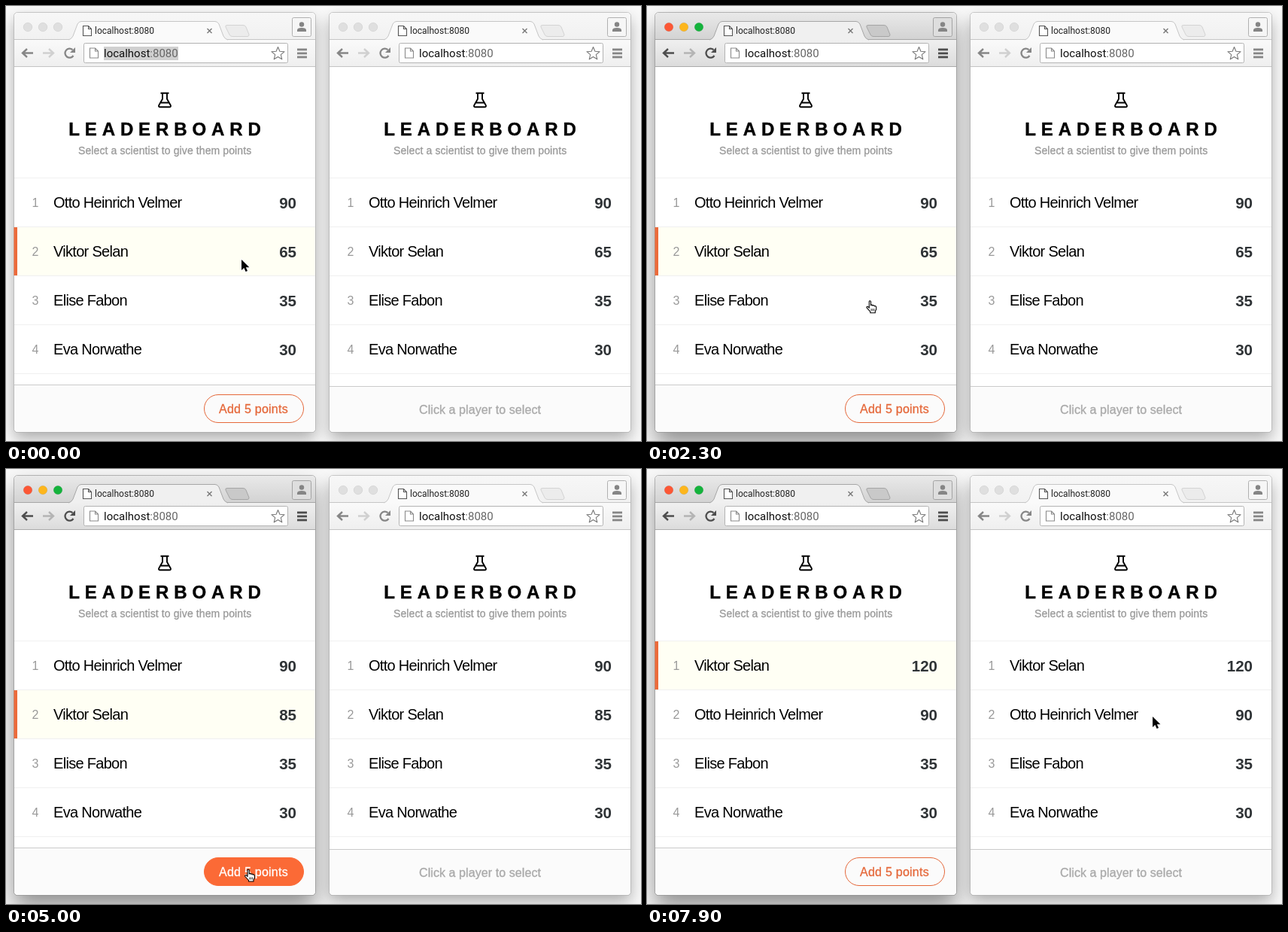
An HTML page for the animation above (8000 ms loop, 844x578 px).

```html
<!DOCTYPE html>
<html lang="en">
<head>
<meta charset="utf-8">
<title>Leaderboard</title>
<style>
  html, body { margin: 0; width: 100%; height: 100%; overflow: hidden; background: #f8f8f8; }
  svg { display: block; font-family: "Liberation Sans", Arial, sans-serif; }
  .ui { font-family: Roboto, "Open Sans", sans-serif; }
  .title { font-size: 24px; font-weight: bold; letter-spacing: 6.9px; stroke: #000; stroke-width: .4px; }
  .sub { font-size: 14px; letter-spacing: .1px; fill: #999; stroke: #999; stroke-width: .3px; }
  .rank { font-size: 16px; fill: #999; text-anchor: middle; }
  .name { font-size: 20px; letter-spacing: -.7px; }
  .score { font-size: 20.5px; font-weight: bold; fill: #2f3336; text-anchor: end; }
  .hint { font-size: 16px; letter-spacing: .08px; fill: #aaa; stroke: #aaa; stroke-width: .35px; text-anchor: middle; }
  .add { font-size: 16px; letter-spacing: .25px; stroke-width: .3px; }
</style>
</head>
<body>
<svg id="stage" width="844" height="578" viewBox="0 0 844 578">
  <defs>
    <filter id="soft" x="-30%" y="-30%" width="160%" height="160%"><feGaussianBlur stdDeviation="15"/></filter>
    <filter id="softer" x="-30%" y="-30%" width="160%" height="160%"><feGaussianBlur stdDeviation="10"/></filter>
    <linearGradient id="barOn" x2="0" y2="1"><stop stop-color="#e9e9e9"/><stop offset="1" stop-color="#d3d3d3"/></linearGradient>
    <linearGradient id="barOff" x2="0" y2="1"><stop stop-color="#f7f7f7"/><stop offset="1" stop-color="#f1f1f1"/></linearGradient>
    <linearGradient id="toolOn" x2="0" y2="1"><stop stop-color="#f0f0f0"/><stop offset="1" stop-color="#dcdcdc"/></linearGradient>
    <linearGradient id="toolOff" x2="0" y2="1"><stop stop-color="#fafafa"/><stop offset="1" stop-color="#efefef"/></linearGradient>
  </defs>
  <g id="scene"></g>
</svg>
<script>
const LOOP = 8000, STEP = 100;
const ACTIVATE = 600, BLUR_URL = 1900, HOVER = 2750, LEAVE = 7250;
const CLICKS = [3250, 3550, 3850, 4600, 5200, 5450, 5700, 5950, 6200, 6450, 6700];
const PATH = [[700, 313, 337], [1300, 281, 335], [2000, 281, 335], [2850, 317, 531.5], [7150, 317, 531.5], [7850, 672, 329]];
const PICKED = 'Viktor Selan';
const scene = document.getElementById('scene');

const clamp = v => Math.max(0, Math.min(1, v));
const ease = p => p * p * (3 - 2 * p);
const rect = (x, y, w, h, fill, more = '') =>
  `<rect x="${x}" y="${y}" width="${w}" height="${h}" fill="${fill}" ${more}/>`;
const path = (d, fill, stroke = 'none', width = 1, more = '') =>
  `<path d="${d}" fill="${fill}" stroke="${stroke}" stroke-width="${width}" ${more}/>`;
const text = (cls, x, y, body, more = '') =>
  `<text class="${cls}" x="${x}" y="${y}" ${more}>${body}</text>`;
const hline = (y, color) => rect(11, y, 400, 1, color);
const blend = (a, b, p) => `color-mix(in srgb, ${b} ${p * 100}%, ${a})`;

function shadow(dx, on) {
  return rect(11 + dx, on ? 25 : 18, 400, 557, '#000',
    `rx="5" opacity="${on ? .42 : .3}" filter="url(#${on ? 'soft' : 'softer'})"`);
}

function page(x, y, color) {
  return path(`M${x} ${y}h7l4 4v9h-11zM${x + 7} ${y}v4h4`, '#fff', color, 1.1);
}

function star(cx, cy) {
  let d = '';
  for (let i = 0; i < 10; i++) {
    const a = i * Math.PI / 5 - Math.PI / 2, r = i % 2 ? 4 : 9;
    d += `${i ? 'L' : 'M'}${(cx + r * Math.cos(a)).toFixed(1)} ${(cy + r * Math.sin(a)).toFixed(1)}`;
  }
  return path(d + 'Z', '#fff', '#777', 1.1, 'stroke-linejoin="round"');
}

function tabs(on) {
  const lights = on ? ['#fc5735', '#fdb61c', '#14b33c'] : Array(3).fill('#dfdfdf');
  const line = on ? '#a6a6a6' : '#c6c6c6';
  return path('M11 44V14Q11 9 16 9H406Q411 9 411 14V44Z', `url(#${on ? 'barOn' : 'barOff'})`) +
    rect(11, 44, 400, 36, `url(#${on ? 'toolOn' : 'toolOff'})`) +
    hline(44, line) +
    lights.map((c, i) => `<circle cx="${29 + 20 * i}" cy="28" r="5.8" fill="${c}" stroke="#000" stroke-opacity=".07"/>`).join('') +
    path('M83 45Q87 44 89 40L95 24Q97 20.5 100 20.5H278Q281 20.5 283 24L289 40Q291 44 295 45', on ? '#f0f0f0' : '#fafafa', line) +
    path('M294 25.5H315Q318 25.5 319 28L323 38Q323 40.5 321 40.5H301Q298 40.5 297 38L292 28Q291 25.5 294 25.5Z', on ? '#c9c9c9' : '#ececec', on ? '#a5a5a5' : '#d3d3d3') +
    page(102.5, 26.5, '#555') +
    text('ui', 118, 37, 'localhost:8080', 'font-size="12" fill="#222"') +
    path('M267.5 30l6 6m0-6l-6 6', 'none', '#777', 1.4) +
    rect(380.5, 15.5, 25, 25, on ? '#dedede' : '#f6f6f6', `rx="2" stroke="${on ? '#a3a3a3' : '#b0b0b0'}"`) +
    `<circle cx="393" cy="24.5" r="3.2" fill="#858585"/>` +
    path('M387 34V32Q387 29 393 29T399 32V34Z', '#858585');
}

function toolbar(on, url) {
  const ink = on ? '#4d4d4d' : '#868686', pale = on ? '#b4b4b4' : '#d0d0d0';
  const focus = url === 'focus';
  const arrow = 'M28 57L22 62.5L28 68M23 62.5H36';
  return path(arrow, 'none', ink, 2.4) +
    path(arrow, 'none', pale, 2.4, 'transform="translate(85 0) scale(-1 1)"') +
    path('M89.5 66A6 6 0 1 1 88.5 58.2', 'none', ink, 2.3) +
    path('M92 55V62H85Z', ink) +
    rect(103.5, 49.5, 271, 26, '#fff', `rx="2" stroke="${focus ? '#5c9ee8' : '#b3b3b3'}" stroke-width="${focus ? 2 : 1}"`) +
    page(111.5, 56, '#8a8a8a') +
    (url ? rect(130, 54, 99, 18, focus ? '#a8d1fb' : '#d0d0d0') : '') +
    text('ui', 130, 68, 'localhost<tspan fill="#666">:8080</tspan>', 'font-size="15" fill="#111"') +
    star(361.5, 63.5) +
    [56.5, 61.5, 66.5].map(y => rect(387, y, 13, 2.8, ink)).join('') +
    hline(80, on ? '#aaa' : '#c4c4c4');
}

function header() {
  return path('M205.5 115.8H216.5M208 116V123.5L203.2 132Q202.4 134.3 205 134.3H217Q219.6 134.3 218.8 132L214 123.5V116M206 128.5H216', 'none', '#000', 1.9, 'stroke-linejoin="round"') +
    text('title', 83.2, 171.5, 'LEADERBOARD') +
    text('sub', 96, 197, 'Select a scientist to give them points') +
    hline(228, '#f0f0f0');
}

function rows(list, picked) {
  return list.map(([name, score], i) => {
    const y = 229 + 65 * i;
    const mark = name === picked ? rect(11, y, 400, 64, '#fffff4') + rect(10.5, y, 4.5, 64, '#ec6a3b') : '';
    return mark + hline(y + 64, '#f0f0f0') +
      text('rank', 39, y + 38, i + 1) +
      text('name', 63, y + 39, name) +
      text('score', 386, y + 40, score);
  }).join('');
}

function footer(top, hover) {
  let body = text('hint', 211, 542, 'Click a player to select');
  if (hover !== null) {
    const ink = blend('#e5683a', '#fff', hover);
    body = rect(263.5, 516.5, 132, 37, '#fb6a36', `rx="18.5" fill-opacity="${hover}" style="stroke:${blend('#e5683a', '#fb6a36', hover)}"`) +
      text('add', 283, 541, 'Add 5 points', `style="fill:${ink};stroke:${ink}"`);
  }
  return path(`M11 ${top}H411V561Q411 566 406 566H16Q11 566 11 561Z`, '#fbfbfb') + hline(top, '#cbcbcb') + body;
}

function win(dx, o) {
  return `<g transform="translate(${dx} 0)">` +
    rect(10.5, 8.5, 401, 558, '#fff', `rx="5" stroke="#000" stroke-opacity="${o.on ? .28 : .2}"`) +
    tabs(o.on) + toolbar(o.on, o.url) + header() + rows(o.list, o.picked) + footer(o.foot, o.hover) + '</g>';
}

function cursorAt(t) {
  let [, x, y] = PATH[0];
  for (let i = 1; i < PATH.length; i++) {
    const [t0, x0, y0] = PATH[i - 1], [t1, x1, y1] = PATH[i];
    if (t < t0) break;
    const p = ease(clamp((t - t0) / (t1 - t0)));
    x = x0 + (x1 - x0) * p;
    y = y0 + (y1 - y0) * p;
  }
  return [x, y];
}

function cursor(t) {
  const [x, y] = cursorAt(t);
  const onRow = x < 411 && y > 228 && y < 489;
  const onButton = x > 262 && x < 396 && y > 515 && y < 554;
  const hand = t >= ACTIVATE && (onRow || onButton);
  const shape = hand
    ? path('M4 1.6C4 .1 6.2 .1 6.2 1.6V6.6C6.6 5.5 8.6 5.7 8.7 7C9.3 6.1 11 6.4 11.1 7.7C11.8 7.1 13.4 7.5 13.4 9V11.8L12 14.5V16.5H5.5V15L.9 10C0 8.5 1.6 7.5 2.8 8.7L4 10Z', '#fff', '#000', 1.1, 'stroke-linejoin="round"') +
      path('M6.8 11V14M8.7 11V14M10.6 11V14', 'none', '#000', .8)
    : path('M0 0V14L3.3 11L5.6 16L8 15L5.8 10.2H10.4Z', '#000', '#fff', 1.6, 'paint-order="stroke"');
  return `<g transform="translate(${x.toFixed(1)} ${y.toFixed(1)})">${shape}</g>`;
}

function draw(t) {
  const on = t >= ACTIVATE;
  const url = !on ? 'idle' : t < BLUR_URL ? 'focus' : '';
  const points = 65 + 5 * CLICKS.filter(c => t >= c).length;
  const list = [['Otto Heinrich Velmer', 90], [PICKED, points], ['Elise Fabon', 35], ['Eva Norwathe', 30]]
    .sort((a, b) => b[1] - a[1]);
  const hover = clamp((t - HOVER) / 200) * (1 - clamp((t - LEAVE) / 200));
  scene.innerHTML = shadow(0, on) + shadow(419, false) +
    win(0, { on, url, list, picked: PICKED, foot: 503, hover }) +
    win(419, { on: false, url: '', list, picked: '', foot: 505, hover: null }) +
    cursor(t);
}

let start = performance.now(), last = -1;
function tick(now) {
  const t = Math.floor(Math.max(0, now - start) % LOOP / STEP) * STEP;
  if (t !== last) draw(last = t);
  requestAnimationFrame(tick);
}
draw(last = 0);
requestAnimationFrame(tick);
</script>
</body>
</html>
```
